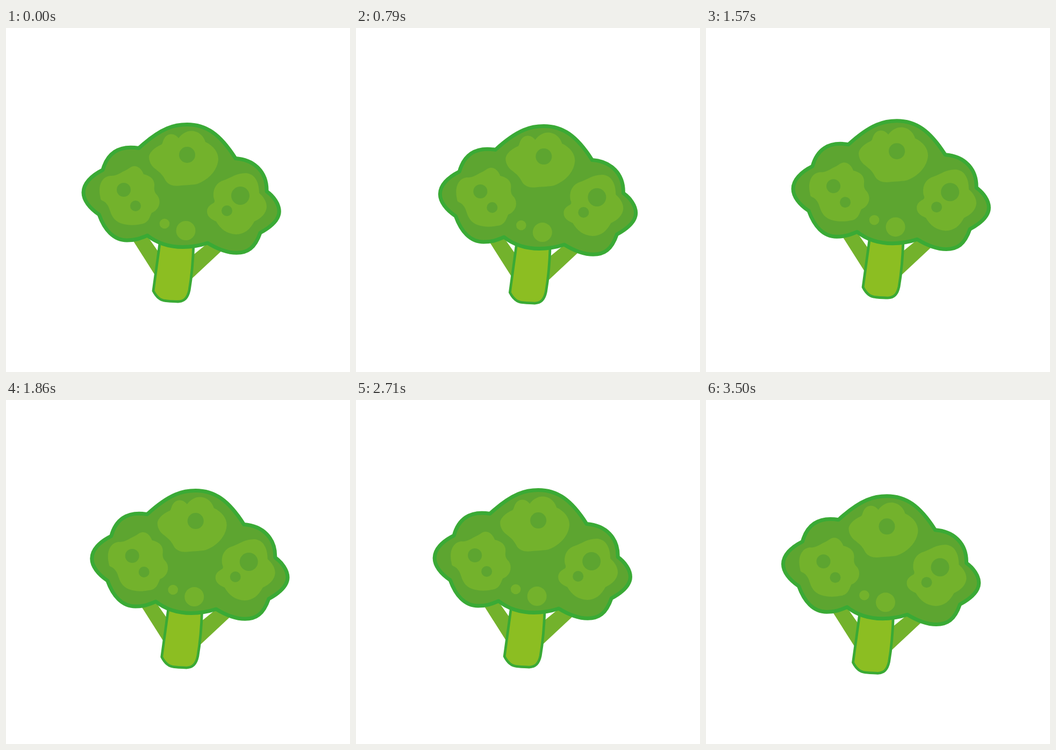
These frames come from a looping animation (640 by 640 pixels, 3.57 s). An HTML page:

```html
<!DOCTYPE html>
<html lang="en">
<head>
<meta charset="utf-8">
<title>Broccoli</title>
<style>
  html, body { margin: 0; width: 100%; height: 100%; overflow: hidden; background: #fff; }
  svg { display: block; width: 100%; height: 100%; }
  .line { stroke: #3aaa35; stroke-linejoin: round; }
  .dark { fill: #5da530; }
  .light { fill: #73b22c; }
  .stem { fill: #8cbe22; }
</style>
</head>
<body>
<svg viewBox="0 0 640 640">
  <g id="plant">
    <path class="light" d="M236 395L260 383L300 440L276 458Z"/>
    <path class="light" d="M375 400.500L406 410L345 467L340 429Z"/>
    <path class="stem line" stroke-width="4.800" d="M287 394L274 489C280 501 288 507 297 507.500C305 508.200 314 509 320 509C332 508.500 338 502 341 488C345 465 348 435 349 400Z"/>
    <path class="dark line" stroke-width="7" d="M247 223.500C290 184 315 179.500 337 179.500C372 179.500 398 197 427 242.500C462 245 486 268 485 304C498 313 508.300 328 508.300 341C508.300 355 495 369 473 381C463 410 449 418.300 429 418.300C410 418.300 393 411 375 400C360 405 346 407.500 329 407.500C304 407.500 282 401 263 386C249 392 240 395 225 395C200 395 183 375 173 347C155 335 144 320 144 306C144 290 158 275 180 264C188 235 208 217 247 223.500Z"/>
    <path class="light" d="M292 211C295 201 302 197 308 197.500C314 198 318 201 321 205C328 196 336 191.500 345 191.500C358 191.500 368 201 371 212C386 219 395 231 395 244C394 262 380 281 356 290C348 292 335 292 326 293C314 295 303 293 297 284C291 272 286 269 279 263C270 257 266 248 266 240C267 230 279 221 289 217Q291 215 292 211Z"/>
    <path class="light" d="M174 303C174 285 183 276 194 275C204 276 212 270 219 266.500C228 263 232 257 239 257C247 257 253 264 256 272C270 275 277 283 276 294C275 303 277 307 282 312C289 322 286 338 271 344C267 352 265 364 250 365C232 369 207 366 199 352C193 343 193 333 187 327C183 321 177 322 176 318C175 312 174 308 174 303Z"/>
    <path class="light" d="M386 313C385 298 392 287 406 283C418 279 428 270 446 270C462 271 471 285 471 307C478 313 485 322 485 333C484 345 475 354 462 360C454 375 443 384 428 384C411 383 399 374 391 360C380 355 374 350 374 341C374 332 382 328 387 325C390 321 386 318 386 313Z"/>
    <circle class="dark" cx="337" cy="236" r="15"/>
    <circle class="dark" cx="219" cy="301" r="13"/>
    <circle class="dark" cx="241" cy="331" r="10"/>
    <circle class="dark" cx="436" cy="312" r="17"/>
    <circle class="dark" cx="411" cy="340" r="10"/>
    <circle class="light" cx="295" cy="364" r="9.300"/>
    <circle class="light" cx="334.500" cy="377" r="18"/>
  </g>
</svg>
<script>
  const LOOP = 3570, STEP = LOOP / 50;

  // Closed drift path: time, x, y
  const path = [
    [0, 0, 0], [570, 9, 3.9], [790, 12.4, 3], [1290, 18.6, -2.6],
    [1860, 15.7, -11], [2210, 10, -13.6], [2710, 2.2, -12],
    [3140, -2.6, -6.3], [3500, -0.5, -0.7]
  ];
  const plant = document.getElementById('plant');

  function key(i) {
    const n = path.length, turn = Math.floor(i / n);
    const [t, x, y] = path[i - turn * n];
    return [t + turn * LOOP, x, y];
  }

  const slope = (a, b, axis) => (b[axis] - a[axis]) / (b[0] - a[0]);

  // Smooth periodic curve through the keys
  function drift(t) {
    let i = path.length - 1;
    while (path[i][0] > t) i--;
    const [a, b, c, d] = [key(i - 1), key(i), key(i + 1), key(i + 2)];
    const h = c[0] - b[0], u = (t - b[0]) / h, v = 1 - u;
    return [1, 2].map(axis =>
      v * v * (1 + 2 * u) * b[axis] + u * u * (1 + 2 * v) * c[axis] +
      h * u * v * (v * slope(a, c, axis) - u * slope(b, d, axis)));
  }

  const start = performance.now();
  function draw(now) {
    const t = Math.max(0, now - start) % LOOP;
    const step = Math.floor((t + 5) / STEP) % 50;
    const [x, y] = drift(step * STEP);
    plant.setAttribute('transform', `translate(${x.toFixed(2)} ${y.toFixed(2)})`);
    requestAnimationFrame(draw);
  }
  draw(start);
</script>
</body>
</html>
```
